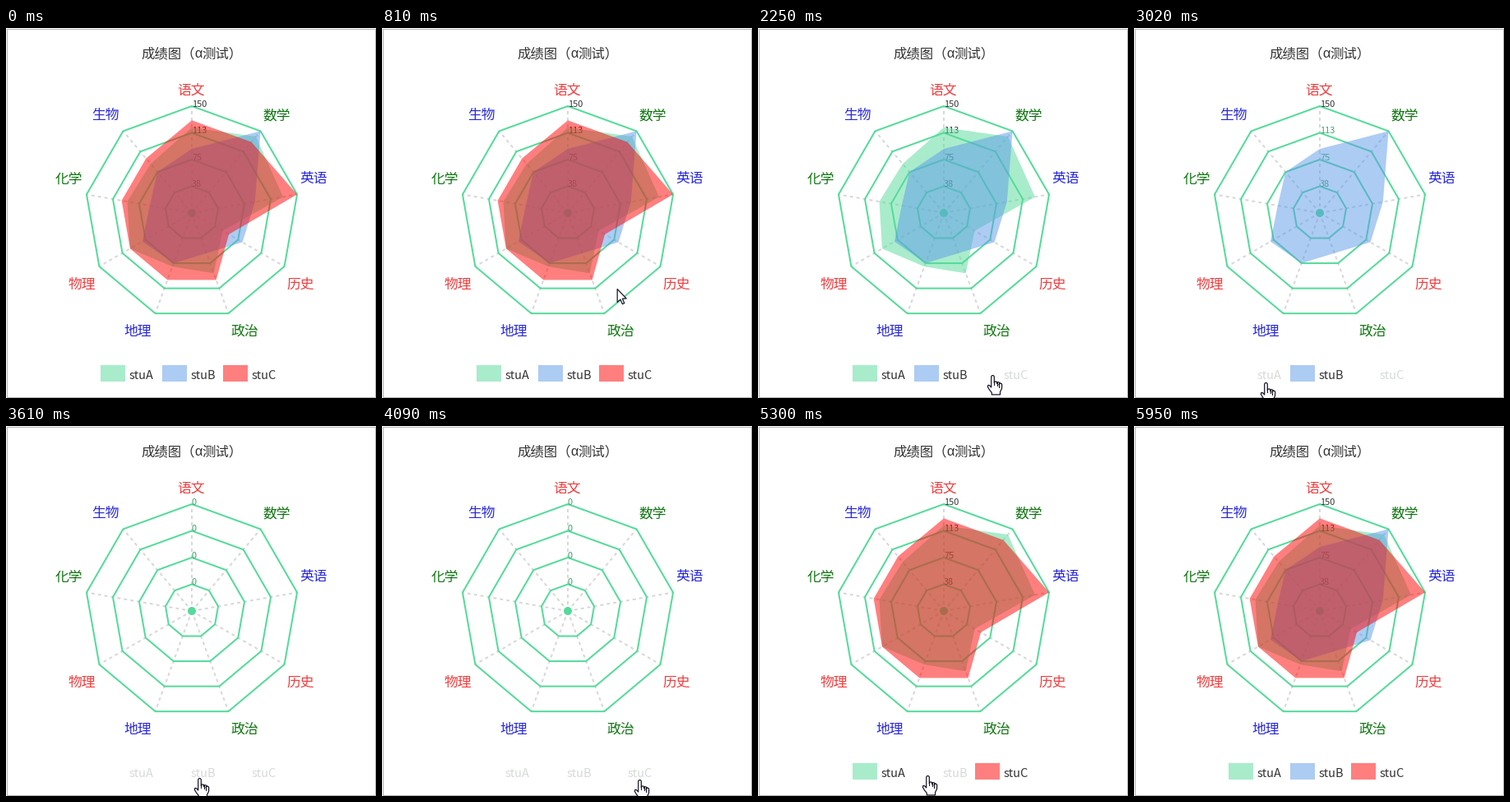
Write a matplotlib script that moves like this. It is 450 by 450 pixels and loops after 6180 ms.

```python
import numpy as np
import matplotlib.pyplot as plt
from matplotlib.animation import FuncAnimation
from matplotlib.patches import Circle, Polygon, Rectangle

SIZE, DPI = 450, 100
LOOP, STEP = 6180, 30
PX = 72 / DPI  # points per pixel
CENTER, RADIUS, TOP = np.array([226, 225]), 130, 150

CJK = "Noto Sans CJK JP"
INK, MUTED, MINT = "#333333", "#d6dbd7", "#54db9a"
RED, GREEN, BLUE = "#f23c3e", "#0e760f", "#2727de"

SUBJECTS = "语文 数学 英语 历史 政治 地理 物理 化学 生物".split()

# name: colour, legend x, scores clockwise from the top
STUDENTS = {
    "stuA": (MINT, 115, [120, 140, 130, 50, 90, 80, 100, 92, 90]),
    "stuB": ("#5c9ae9", 190, [90, 150, 90, 82, 60, 75, 80, 60, 75]),
    "stuC": ("#ff0000", 264, [130, 130, 150, 60] + [100] * 5),
}
# each click toggles one legend entry
CLICKS = list(zip([1260, 1830, 2250, 3020, 3610, 4300, 4990, 5620], "BBCABCAB"))

# the cursor sweeps in on an arc, then glides from stop to stop
ENTER, ARC_END, LEAVE, GLIDE = 110, 720, 5950, 270
ARC = np.array([(82, 449), (340, 180), (293, 302)])
STOPS = [(1040, 235, 421), (2250, 285, 422), (2810, 160, 431), (3380, 235, 428),
         (4090, 313, 430), (4650, 149, 425), (5390, 226, 425), (LEAVE, 134, 450)]

ARROW = np.array([(0, 0), (0, 16), (3.7, 12.6), (6.2, 18.2), (8.6, 17.2),
                  (6.2, 11.7), (11, 11.5)])
FINGERS = [(0, 0), (3.6, 7.4), (6.8, 8.2), (9.4, 9.6)]  # middle x, top y
HAND_DARK = "#111122"


def hand_outline():
    bend = np.linspace(np.pi, 2 * np.pi, 6)
    points = []
    for x, y in FINGERS:
        points += zip(x + 1.8 * np.cos(bend), y + 1.8 + 1.8 * np.sin(bend))
    wrist = [(11, 16), (9, 20), (9, 23.4), (-1.2, 23.4), (-1.2, 21)]
    thumb = [(-4, 17.5), (-6.2, 13.8), (-5.6, 11.9), (-4, 12.1), (-1.8, 14.5)]
    return np.array(points + wrist + thumb)


HAND = hand_outline()


def spokes(radii):
    angle = np.radians(40 * np.arange(9))
    unit = np.column_stack([np.sin(angle), -np.cos(angle)])
    return CENTER + unit * np.reshape(radii, (-1, 1))


def label(x, y, text, size, color, ha="left", font=CJK, z=2):
    """Write text whose middle height is y."""
    return ax.text(x, y + .38 * size, text, fontsize=size * PX, color=color,
                   ha=ha, va="baseline", family=font, zorder=z)


fig = plt.figure(figsize=(SIZE / DPI, SIZE / DPI), dpi=DPI, facecolor="white")
ax = fig.add_axes([0, 0, 1, 1])
ax.set(xlim=(0, SIZE), ylim=(SIZE, 0))
ax.axis("off")

ax.add_patch(Rectangle((.5, .5), 448, 448, fill=False, ec="#b4b4b4", lw=PX))
label(164, 30, "成绩图（", 16.4, INK)
label(229, 30, "α", 16.4, INK, font="Liberation Sans")
label(238, 30, "测试）", 16.4, INK)

# subject names sit just outside the corners
corners = spokes(RADIUS)
for i, (name, corner) in enumerate(zip(SUBJECTS, corners)):
    side = np.sign(np.round(corner - CENTER))
    x, y = corner + side * 20.5
    label(x - .7, y, name, 16.8, (RED, GREEN, BLUE)[i % 3], ha="center")

# radar grid
for x, y in corners:
    ax.plot([CENTER[0], x], [CENTER[1], y], color="#d8d8d8", lw=2 * PX,
            ls=(0, (2, 2)), dash_capstyle="butt", zorder=1)
scale = []
for ring in range(1, 5):
    r = RADIUS * ring / 4
    ax.add_patch(Polygon(spokes(r), fill=False, ec=MINT, lw=2 * PX,
                         joinstyle="round", zorder=1.5))
    scale.append(label(226, CENTER[1] - r - 3.5, "", 11, INK))
ax.add_patch(Circle(CENTER, 5, fc=MINT, ec="none", zorder=1.6))

series = []
for name, (color, x, scores) in STUDENTS.items():
    look = dict(fc=color, ec="none", alpha=.5, zorder=3)
    area = ax.add_patch(Polygon(spokes(np.array(scores) * RADIUS / TOP), **look))
    swatch = ax.add_patch(Rectangle((x, 410), 30, 20, **look))
    series.append((area, swatch, label(x + 35, 421, name, 14.5, INK, z=6)))

pointer = ax.add_patch(Polygon(ARROW, fc="white", ec=HAND_DARK, lw=1.2 * PX,
                               joinstyle="round", zorder=9))
knuckles = [ax.plot([], [], color=HAND_DARK, lw=PX, zorder=10)[0]
            for _ in FINGERS[1:]]


def cursor_at(t):
    u = np.clip((t - ENTER) / (ARC_END - ENTER), 0, 1)
    spot = np.array([(1 - u) ** 2, 2 * u * (1 - u), u * u]) @ ARC
    for arrive, *stop in STOPS:
        u = np.clip((t - arrive) / GLIDE + 1, 0, 1)
        spot = spot + (stop - spot) * u * u * (3 - 2 * u)
    return spot


def draw_cursor(t):
    shown = ENTER <= t < LEAVE
    x, y = cursor_at(t) + .5
    over = 408 < y < 434 and any(left <= x <= left + 65
                                 for _, left, _ in STUDENTS.values())
    pointer.set_visible(shown)
    pointer.set_xy((HAND if over else ARROW) + (x, y))
    for line, (dx, top) in zip(knuckles, FINGERS[1:]):
        line.set_visible(shown and over)
        line.set_data([x + dx - 1.8] * 2, [y + top + 1, y + top + 4.5])


def draw_scale(on):
    only_b = on == [False, True, False]
    for ring, text in enumerate(scale, 1):
        text.set_text(str(int(TOP * ring / 4 + .5) if any(on) else 0))
        green = not any(on) or (only_b and ring < 4)
        text.set_color("#3da567" if green else INK)


def update(frame):
    t = frame * STEP + 20
    done = [who for when, who in CLICKS if when <= t]
    on = [done.count(name[-1]) % 2 == 0 for name in STUDENTS]
    for (area, swatch, name), shown in zip(series, on):
        area.set_visible(shown)
        swatch.set_visible(shown)
        name.set_color(INK if shown else MUTED)
    draw_scale(on)
    draw_cursor(t)
    return []


anim = FuncAnimation(fig, update, frames=LOOP // STEP, interval=STEP,
                     repeat=True, repeat_delay=0, blit=False)
plt.show()
```
